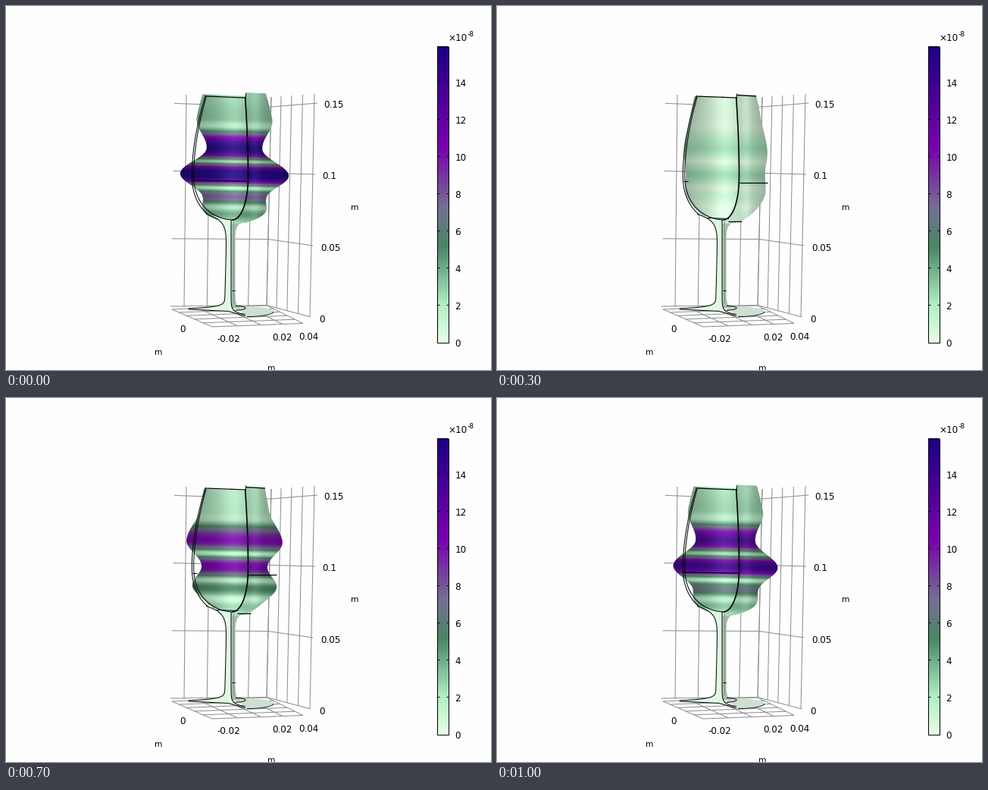
Recreate the animation shown at these times as a matplotlib script. Size 640x480 px, loop 1100 ms.

```python
import numpy as np
import matplotlib.pyplot as plt
from matplotlib.animation import FuncAnimation
from matplotlib.colors import LinearSegmentedColormap

W, H, DPI = 640, 480, 100
FRAMES, STEP = 11, 100
PX = 72 / DPI
PEAK = 15.9
CX = 301.5
BELLY = 222

plt.rcParams["font.family"] = "DejaVu Sans"
fig = plt.figure(figsize=(W / DPI, H / DPI), dpi=DPI, facecolor="#fefefe")
ax = fig.add_axes([0, 0, 1, 1])
ax.axis("off")

stops = [(0, "#e5ffe5"), (2, "#b0eec4"), (5.1, "#4a8666"),
         (7.2, "#747092"), (10.5, "#7a00ae"), (PEAK, "#1c0082")]
cmap = LinearSegmentedColormap.from_list(
    "aurora", [(v / PEAK, c) for v, c in stops], N=512)


def line(x, y, color="black", width=1.0, z=4):
    return ax.plot(x, y, color=color, lw=width * PX, zorder=z,
                   solid_capstyle="butt")[0]


def label(x, y, text, size=12, ha="center"):
    ax.text(x - 0.5, y, text, size=size * PX, ha=ha, va="center_baseline")


def radius(y, size=54.6, taper=13.6, depth=65):
    """Bowl outline: gentle taper above the belly, round below it."""
    up = np.clip((BELLY - y) / 104, 0, None)
    down = np.clip((y - BELLY) / depth, 0, 1)
    return (size - taper * up**1.8) * np.sqrt(1 - down**2.3)


def flare(y, start, width, reach):
    """Widening that dies away with the distance from start."""
    return width * np.exp(-np.abs(y - start) / reach)


def arc(cx, cy, rx, ry, a, b):
    t = np.pi * np.linspace(a, b, 40)
    return cx + rx * np.cos(t), cy + ry * np.sin(t)


def steps(ratio, n=4):
    """Fractions from 0 to 1 whose spacing grows by ratio."""
    return (ratio ** np.arange(n + 1) - 1) / (ratio**n - 1)


def rulings(a, b, c, d, fractions):
    """Lines joining edge a-b to edge c-d."""
    a, b, c, d = np.array([a, b, c, d], float)
    for f in fractions:
        line(*zip(a + (b - a) * f, c + (d - c) * f), "#8c8c8c", z=0)


def draw_axes():
    rulings((238, 117), (350, 120), (235, 397), (344, 395), steps(0.93))
    rulings((350, 120), (407, 116), (344, 395), (401, 410), steps(1.06))
    corners = (219, 400), (344, 395), (272, 423), (392, 418.5)
    rulings(*corners, steps(0.93))
    rulings(corners[0], corners[2], corners[1], corners[3], steps(1.06, 5))
    for k in range(4):
        line([217 + 1.7 * k, 344 + 1.7 * k, 402 + 3 * k],
             [396 - 89.2 * k, 394.7 - 87.2 * k, 410 - 94 * k], "#8c8c8c", z=0)
        label(413.5 + 2.2 * k, 412 - 94.3 * k, f"{0.05 * k:g}", ha="left")
    for x, y, text in ((234, 425, "0"), (294, 438, "-0.02"),
                       (365, 436, "0.02"), (400, 435, "0.04")):
        label(x, y, text)
    for x, y in ((202, 456), (351, 477), (461, 265)):
        label(x, y, "m", 10.5)


def draw_colorbar():
    left, right, top, low = 568.5, 583.5, 53.5, 443.5
    ax.imshow(np.linspace(1, 0, 390)[:, None], cmap=cmap, aspect="auto",
              extent=(left, right, low, top), interpolation="nearest")
    line([left, right, right, left, left], [top, top, low, low, top])
    for v in range(0, 16, 2):
        y = low - v * (low - top) / PEAK
        line([left, left + 3], [y, y])
        line([right - 3, right], [y, y])
        label(593, y + 0.5, str(v), ha="left")
    label(584, 41, "×10", ha="left")
    label(609, 36, "-8", 9, ha="left")


def draw_stem():
    disc = arc(318, 403, 35, 6.6, -0.65, 0.5)
    ax.fill(*disc, color="#ccdfd1", lw=0, zorder=1)
    line(*arc(318, 403, 35, 6.6, 0, 0.5), width=0.8)

    y = np.linspace(281, 398, 150)
    edge = 302 + flare(y, 281, 18, 5) + flare(y, 398, 7, 4)
    ax.fill_betweenx(y, 297, edge, color="#a4bcab", lw=0, zorder=1)

    y = np.linspace(274.5, 399, 200)
    left = (291 - 0.025 * np.clip(y - 300, 0, None)
            - flare(y, 274.5, 27, 8) - flare(y, 399, 48, 2.3))
    yb = np.linspace(407, 282, 200)
    back = 297 + flare(yb, 407, 19, 3.5)
    foot = [241, 293, 316], [400, 402.5, 409]
    ax.fill(np.concatenate([left, foot[0], back]),
            np.concatenate([y, foot[1], yb]), color="#dff8e3", lw=0, zorder=3)
    line(left, y)
    line(*foot)
    line(back, yb)
    line([299.5, 299.5], [284, 392], "#7d9484", z=3)
    line(*arc(303, 398.3, 13, 2.8, -0.5, 0.5), width=0.9)
    line([298, 302], [374.5, 374.5])


def cut(y):
    return 298.5 + radius(y, 21, 4, 60)


def draw_profile():
    y = np.linspace(118, 274.5, 100)
    line(300 - radius(y, 54.7, 18), y)
    y = 282 - 162 * np.linspace(0, 1, 150) ** 2
    line(300 - radius(y, 52.3, 17, 60), y)
    line(cut(y), y, width=1.6)
    line([263, 316], [119, 121], width=1.2)
    line([315.7, 315.7], [115, 122])


# Turning points of the radial mode shape: height and swing in pixels
lobes = np.array([(100, 1), (148, 2.5), (188.5, -16), (222.5, 17),
                  (251, -7.7), (275, 4), (291, 0)])


def bend(y):
    """Radial mode shape, eased from one lobe to the next."""
    ly, swing = lobes.T
    pos = np.interp(y, ly, np.arange(len(ly)))
    i = np.minimum(pos.astype(int), len(ly) - 2)
    ease = (1 - np.cos(np.pi * (pos - i))) / 2
    return swing[i] + (swing[i + 1] - swing[i]) * ease


X0, X1, Y0, Y1 = 215, 390, 108, 294
xs, ys = np.meshgrid(np.arange(X0, X1) + 0.5, np.arange(Y0, Y1) + 0.5)
tilted = ys - 0.02 * (xs - CX)
REST, BEND, CUT = radius(tilted), bend(tilted), cut(ys)


def bowl(amp):
    """RGBA picture of the vibrating bowl."""
    disp = BEND * amp
    size = np.maximum(REST + disp, 1)
    outer = xs > CUT + 0.12 * disp

    value = np.hypot(BEND, 1.7) * abs(amp)
    rgb = cmap(np.clip(value / PEAK, 0, 1))[..., :3]

    side = np.clip(np.abs(xs - CX) / size, 0, 1)
    slope = np.clip(np.gradient(size, axis=0), -1.5, 1.5)
    shade = 0.81 - 0.13 * side**3 - 0.05 * slope
    gleam = np.where(outer, 0.08 * np.exp(-((xs - 329) / 7) ** 2),
                     0.14 * np.exp(-((xs - 301) / 18) ** 2))
    light = (shade + 0.4 * gleam)[..., None]
    rgb = np.clip(rgb * light + 0.03 + 0.7 * gleam[..., None], 0, 1)

    rim = np.where(xs >= 316, 116 + (xs - 316) * 0.05,
                   118.5 + (xs - 263) * 0.04) - 2 * amp
    alpha = (np.clip(size - np.abs(xs - CX) + 0.5, 0, 1)
             * np.clip(ys - rim + 0.5, 0, 1))
    alpha[(ys > 282) & (xs < 298)] = 0
    return np.dstack([rgb, alpha])


draw_axes()
draw_colorbar()
draw_stem()
draw_profile()
skin = ax.imshow(bowl(1), extent=(X0, X1, Y1, Y0), aspect="auto",
                 interpolation="nearest", zorder=2)
ax.set_xlim(0, W)
ax.set_ylim(H, 0)

# Edges that the moving wall hides or uncovers
swollen = [line([246, 321], [230, 231], width=1.2)]
shrunk = [line([246, 252], [230.5, 230.5]),
          line([320, 357], [232.5, 232.5], width=1.2),
          line([305, 323], [283.5, 283.5], width=1.2),
          line([316, 342], [117.5, 119], width=1.3)]
floor = line([278, 306], [279.5, 280.5])


def update(k):
    amp = np.cos(2 * np.pi * k / FRAMES)
    skin.set_data(bowl(amp))
    for art in swollen:
        art.set_visible(amp > 0)
    for art in shrunk:
        art.set_visible(amp < 0)
    floor.set_visible(amp < 0.6)
    return [skin, floor, *swollen, *shrunk]


anim = FuncAnimation(fig, update, frames=FRAMES, interval=STEP,
                     repeat=True, repeat_delay=0, blit=False)
plt.show()
```
